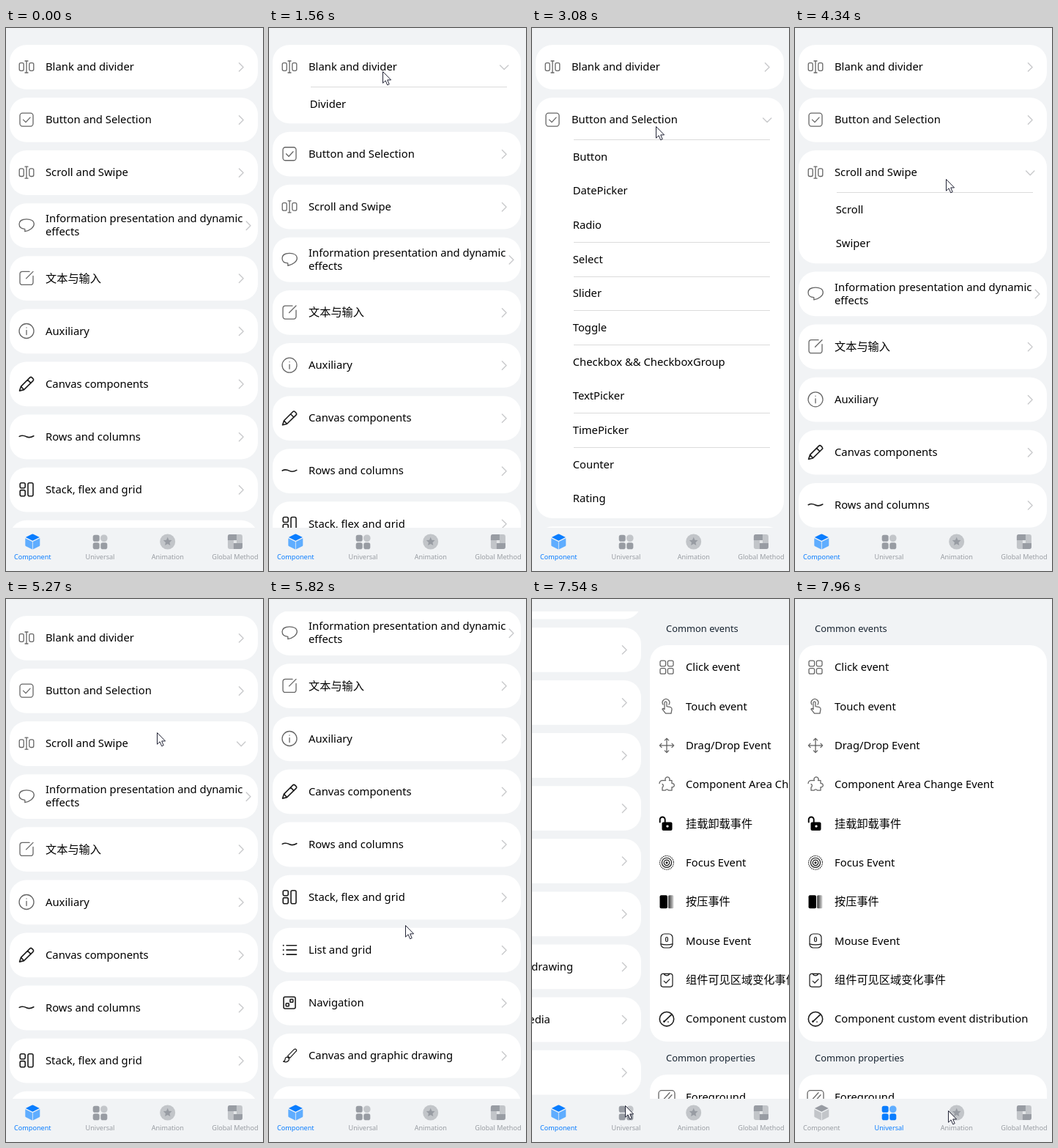
An HTML page that plays this animation: 351 px wide and 741 px high, repeating every 8000 ms.

```html
<!DOCTYPE html>
<html lang="en">
<head>
<meta charset="utf-8">
<title>Component gallery</title>
<style>
html, body { margin: 0; width: 100%; height: 100%; overflow: hidden; background: #f1f3f5; }
svg { display: block; width: 351px; height: 741px; }
text { font: 14.8px "Noto Sans", "Noto Sans CJK SC", sans-serif; fill: #000; }
text.cjk { font: 15.2px "Noto Sans CJK SC", "Noto Sans CJK", sans-serif; }
text.head { font-size: 12.9px; fill: #1a2633; }
.card { fill: #fff; }
.icon { fill: none; stroke: #666; stroke-width: 1.3; stroke-linecap: round; stroke-linejoin: round; }
.dark { stroke: #1c1c1c; stroke-width: 1.6; }
.thin { stroke: #1c1c1c; stroke-width: 1.2; }
.solid { fill: #000; stroke: none; }
.ink { fill: #1c1c1c; stroke: none; }
.chevron { fill: none; stroke: #c9cacc; stroke-width: 1.4; stroke-linecap: round; stroke-linejoin: round; }
.tab { --main: #989ca3; --soft: #c2c5c9; --label: #999da3; }
.tab.on { --main: #0a7dff; --soft: #5fadff; --label: #0a7dff; }
.tab text { font-size: 9.1px; text-anchor: middle; fill: var(--label); }
.main { fill: var(--main); }
.soft { fill: var(--soft); }
</style>
</head>
<body>
<svg id="stage" viewBox="0 0 351 741"></svg>
<script>
const LOOP = 8000, FRAME = 125, WIDTH = 351;
const FIRST = 53.3, PITCH = 72.1, SUB = 46.66, EVENT = 53.33, CARD = 60.8;

const box = (x, y, w, h, r, extra = '') =>
  `<rect x="${x}" y="${y}" width="${w}" height="${h}" rx="${r}" ${extra}/>`;
const path = (d, extra = '') => `<path d="${d}" ${extra}/>`;
const dot = (x, y, r, extra = '') => `<circle cx="${x}" cy="${y}" r="${r}" ${extra}/>`;
const card = (y, h) => box(5, y, 339, h, 23, 'class="card"');
const label = (x, y, s, cls = '') =>
  `<text x="${x}" y="${y}" class="${/[\u4e00-\u9fff]/.test(s) ? 'cjk' : cls}">${s.replace(/&/g, '&amp;')}</text>`;
const icon = ([shape, cls = ''], y = 0) =>
  `<g class="icon ${cls}" transform="translate(28 ${y - .3})">${shape}</g>`;

const ink = 'class="ink"', main = 'class="main"', soft = 'class="soft"';
const icons = {
  split: [box(-9.8, -5.3, 6, 10.6, 2) + box(3.8, -5.3, 6, 10.6, 2) + path('M0-7.5V7.5M-2-8H2M-2 8H2')],
  check: [box(-9, -9, 18, 18, 3.5) + path('M-4.5 0L-1 3.5L5-3')],
  bubble: [path('M-2.2 8.3V5C-7 4.8-10 2.3-10-1.7C-10-6-6-8.5 0-8.5S10.3-6 10.3-1.7C10.3 2.5 5 7-2.2 8.3Z')],
  write: [path('M4-9H-5.5Q-9-9-9-5.5V5.5Q-9 9-5.5 9H5.5Q9 9 9 5.5V-3M-.5.5L9-9')],
  info: [dot(0, 0, 10) + path('M0-1V5M0-4.6V-4.5')],
  pencil: [path('M-9.5 9.5L-7.5 3.5L4.5-8.5Q6-10 7.5-8.5L9-7Q10.3-5.5 9-4.2L-3.5 8ZM1.5-5.5L6-1M-7.2 4L-4 7.4'), 'dark'],
  wave: [path('M-9.8-.3C-6-2.5-3-1.5 0 0S6 1.2 9.8-1'), 'dark'],
  stack: [box(-8.8, -9, 7, 7, 2) + box(-8.8, .8, 7, 8.2, 2) + box(2, -9, 7, 18, 2), 'dark'],
  list: [[-6.2, 0, 6.2].map(y => path(`M-4 ${y}H9.5`) + dot(-8.3, y, 1, ink)).join(''), 'dark'],
  nav: [box(-8, -8, 16, 16, 2) + box(.8, -4.8, 4, 4, .8) + box(-4.8, .8, 4, 4, .8), 'dark'],
  brush: [path('M-2.5.5L6-8.2Q8-9.8 9.2-8.3T8.5-5.5L.5 3.2ZM-3 2Q-6 2-6 5Q-6 7.5-8.5 8Q-3 10-.8 6Q.2 3.5-3 2Z'), 'thin'],
  clip: [box(-9, -9, 18, 18, 3) + path('M-9-3.8H9M-4.5-9L-3-4M2-9L3.5-4') + path('M-2-.5L4 2.7L-2 6Z', ink), 'dark'],
  planet: [dot(0, 0, 8) + path('M-6-6C-11-12-10-5-3 2.5S10 12 9.3 7.5M-9-9.3Q-7-9-5.5-7M7 4Q9.5 7 9.3 9.3'), 'dark'],
  four: [[-9, 1.4].map(x => box(x, -9, 7.6, 7.6, 2) + box(x, 1.4, 7.6, 7.6, 2)).join('')],
  touch: [path('M-3 4V-5.5Q-1.5-8 0-5.5V0L5.5 1.2Q7.3 2 7 4L6 9.5H-1.5L-6 3.8Q-5.5 2-3 4M-5-2.5A4.8 4.8 0 1 1 3-2.5')],
  move: [[0, 90, 180, 270].map(a => path('M0 0H9.5M7-2.7L9.7 0L7 2.7', `transform="rotate(${a})"`)).join('')],
  puzzle: [path('M-5-5.5H-1.5A3 3 0 1 1 3.5-5.5H7V-1.5A2.6 2.6 0 1 1 7 3.5V8H2.5A2.5 2.5 0 0 0-2 8H-6V3.8A2.4 2.4 0 0 0-6-.5M-10-1.5Q-9.5-6-5-5.5')],
  lock: [box(-6.5, -2, 14, 11.5, 2) + dot(1, 3.6, 1.7, 'fill="#fff"') +
    path('M-9.3-2V-5.5A3.5 3.5 0 0 1-2.3-5.5V-2', 'fill="none" stroke="#000" stroke-width="1.9"'), 'solid'],
  focus: [dot(0, 0, 9.4, 'stroke-dasharray=".5 1.96"') + dot(0, 0, 6.6) + dot(0, 0, 3.8) + dot(0, 0, 1.6, ink), 'thin'],
  press: [box(-9.5, -9, 10.5, 18, 2) + box(2.2, -9, 7.3, 18, 1.5, 'fill="url(#fade)"'), 'solid'],
  mouse: [box(-8, -9.5, 16, 19, 5) + box(-1.4, -5, 2.8, 6, 1.4) + path('M-8 4.3Q0 6.5 8 4.3'), 'thin'],
  board: [box(-8, -8.5, 16, 18, 3) + path('M-4-8.5Q-3-6 0-6T4-8.5M-3.8 1.5L-1 4.2L4-1'), 'thin'],
  gauge: [dot(0, 0, 9.7) + path('M-3.5 3.5L6-5.5') + dot(-3.6, 3.4, 1.4, ink) + dot(2, 4, .8, ink), 'dark'],
  hatch: [box(-11, -9, 22, 20, 4) + path('M-6 5L4-6M-1 6L7-3')]
};

// A leading "-" puts a divider above the item.
const rows = [
  ['split', 'Blank and divider', ['-Divider']],
  ['check', 'Button and Selection', ['-Button', 'DatePicker', 'Radio', '-Select', '-Slider', '-Toggle',
    '-Checkbox && CheckboxGroup', 'TextPicker', '-TimePicker', '-Counter', 'Rating']],
  ['split', 'Scroll and Swipe', ['-Scroll', 'Swiper']],
  ['bubble', 'Information presentation and dynamic|effects'], ['write', '文本与输入'],
  ['info', 'Auxiliary'], ['pencil', 'Canvas components'], ['wave', 'Rows and columns'],
  ['stack', 'Stack, flex and grid'], ['list', 'List and grid'], ['nav', 'Navigation'],
  ['brush', 'Canvas and graphic drawing'], ['clip', 'Image Video And Media'], ['planet', 'Web']
];
const events = [
  ['four', 'Click event'], ['touch', 'Touch event'], ['move', 'Drag/Drop Event'],
  ['puzzle', 'Component Area Change Event'], ['lock', '挂载卸载事件'], ['focus', 'Focus Event'],
  ['press', '按压事件'], ['mouse', 'Mouse Event'], ['board', '组件可见区域变化事件'],
  ['gauge', 'Component custom event distribution']
];

const rowY = i => FIRST + i * PITCH;
const subItem = (s, k, i) => {
  const lineY = Math.floor(rowY(i) + 27 + k * SUB) - rowY(i);
  const line = s[0] === '-' ? box(57, lineY, 268, 1, 0, 'opacity=".14"') : '';
  return line + label(55.7, 55.3 + k * SUB, s.replace('-', ''));
};
const row = ([name, title, subs = []], i) => {
  const lines = title.split('|');
  const text = lines.map((s, k) => label(54, 4.8 + (k - (lines.length - 1) / 2) * 18, s)).join('');
  return `<g class="row">${card(-CARD / 2, CARD)}${icon(icons[name])}${text}
    <path class="chevron" data-x="${lines.length > 1 ? 331 : 321.2}"/>
    <g class="sub">${subs.map((s, k) => subItem(s, k, i)).join('')}</g></g>`;
};
const eventRow = ([name, title], i) => {
  const y = 93.5 + i * EVENT;
  return icon(icons[name], y) + label(54, y + 4.9, title);
};

const star = Array.from({ length: 10 }, (_, i) => {
  const r = i % 2 ? 2.9 : 6.2, a = i * Math.PI / 5;
  return [r * Math.sin(a), -r * Math.cos(a)];
}).join(' ');
const tabs = [
  ['Component', path('M-9.5-6L-1-10.3Q0-10.8 1-10.3L9.5-6L0-1.2Z', main) +
    path('M-10-4.8L-.4 0V10.5L-9 6.2Q-10 5.7-10 4.7ZM10-4.8L.4 0V10.5L9 6.2Q10 5.7 10 4.7Z', soft)],
  ['Universal', box(-9.8, -9.3, 9, 9, 2.8, main) + box(-9.8, 1.2, 9, 9, 2.8, main) +
    box(.8, 1.2, 9, 9, 2.8, main) + box(.6, -9.5, 9.4, 9.4, 4.2, soft)],
  ['Animation', dot(0, 0, 10.5, soft) + `<polygon points="${star}" ${main}/>`],
  ['Global Method', box(-10, -10, 20, 20, 3, soft) +
    path('M-7-10H2V-2H-10V-7Q-10-10-7-10ZM10 2V7Q10 10 7 10H-2V2Z', main) + box(-2, -2, 4, 4, 0, 'fill="#e4e6e8"')]
];

const stage = document.getElementById('stage');
stage.innerHTML = `
  <defs>
    <clipPath id="view"><rect y="17" width="351" height="665"/></clipPath>
    <linearGradient id="fade"><stop stop-color="#333"/><stop offset="1" stop-color="#ddd"/></linearGradient>
  </defs>
  <g clip-path="url(#view)"><g id="pages">
    <g id="list">${rows.map(row).join('')}</g>
    <g transform="translate(${WIDTH})">
      ${label(27, 44.8, 'Common events', 'head')}${card(63, 541)}${events.map(eventRow).join('')}
      ${label(27, 631.3, 'Common properties', 'head')}${card(649, 120)}
      ${icon(icons.hatch, 680)}${label(54, 685, 'Foreground')}
    </g>
  </g></g>
  ${tabs.map(([name, shape], i) => `<g class="tab" transform="translate(${36.3 + i * 92.2} 701)">
    ${shape}<text y="24.3">${name}</text></g>`).join('')}
  <path id="cursor" d="M.5.5V16.2L4.1 12.8L6.7 18.8L9.2 17.7L6.7 11.9H11.6Z"
    fill="#fff" stroke="#222436" stroke-linejoin="round"/>`;

// Which row is open, and when.
const visits = [
  { row: 0, from: 1560, to: 2210 }, { row: 1, from: 2930, to: 3580 }, { row: 2, from: 4215, to: 5270 }
];
// Moves: [start ms, steps, target...], one step per FRAME, slowing down.
const cursorMoves = [
  [910, 4, 155, 59], [2360, 2, 160, 156], [2660, 3, 169, 134], [3705, 4, 206, 206],
  [4490, 3, 201, 273], [4885, 2, 206, 182], [5400, 1, 190, 640], [5550, 3, 186, 445],
  [5940, 1, 186, 694], [6090, 4, 178, 517], [6870, 3, 127, 691], [7690, 3, 209, 698]
];
const scrollMoves = [[5550, 3, 223], [5940, 5, 344.5]];
const slideMoves = [[7540, 3, WIDTH]];
const TAB_SWITCH = 7960;

const easeOut = p => 1 - (1 - p) ** 2;
function follow(moves, t, origin) {
  return moves.reduce((pos, [start, steps, ...target]) => {
    if (t < start) return pos;
    const p = easeOut(Math.min(1, (1 + Math.floor((t - start) / FRAME)) / steps));
    return pos.map((v, i) => v + (target[i] - v) * p);
  }, origin);
}
const openRow = (t, delay = 0) => visits.find(v => t >= v.from && t < v.to + delay)?.row ?? -1;

const place = (el, x, y) => el.setAttribute('transform', `translate(${x} ${y})`);
const [pages, list, cursor] = ['pages', 'list', 'cursor'].map(id => document.getElementById(id));
const tabEls = [...stage.querySelectorAll('.tab')];
const rowEls = [...stage.querySelectorAll('.row')].map(el => ({
  el, back: el.querySelector('.card'), sub: el.querySelector('.sub'), chevron: el.querySelector('.chevron')
}));

function draw(t) {
  const open = openRow(t), turned = openRow(t, FRAME);
  const grow = open < 0 ? 0 : rows[open][2].length * SUB;
  rowEls.forEach(({ el, back, sub, chevron }, i) => {
    place(el, 0, rowY(i) + (i > open ? grow : 0));
    back.setAttribute('height', CARD + (i === open ? grow : 0));
    sub.style.display = i === open ? '' : 'none';
    const x = +chevron.dataset.x;
    chevron.setAttribute('d', i === turned
      ? `M${x - 5.6}-2.4l5.6 5.6l5.6-5.6` : `M${x - 2.8}-5.6l5.7 5.7l-5.7 5.7`);
  });
  place(list, 0, -follow(scrollMoves, t, [0])[0]);
  place(pages, -follow(slideMoves, t, [0])[0], 0);
  place(cursor, ...follow(cursorMoves, t, [40, 105]));
  cursor.style.display = t < cursorMoves[0][0] ? 'none' : '';
  tabEls.forEach((el, i) => el.classList.toggle('on', i === +(t >= TAB_SWITCH)));
}

const begin = performance.now();
function tick() {
  draw((performance.now() - begin) % LOOP);
  requestAnimationFrame(tick);
}
tick();
</script>
</body>
</html>
```
